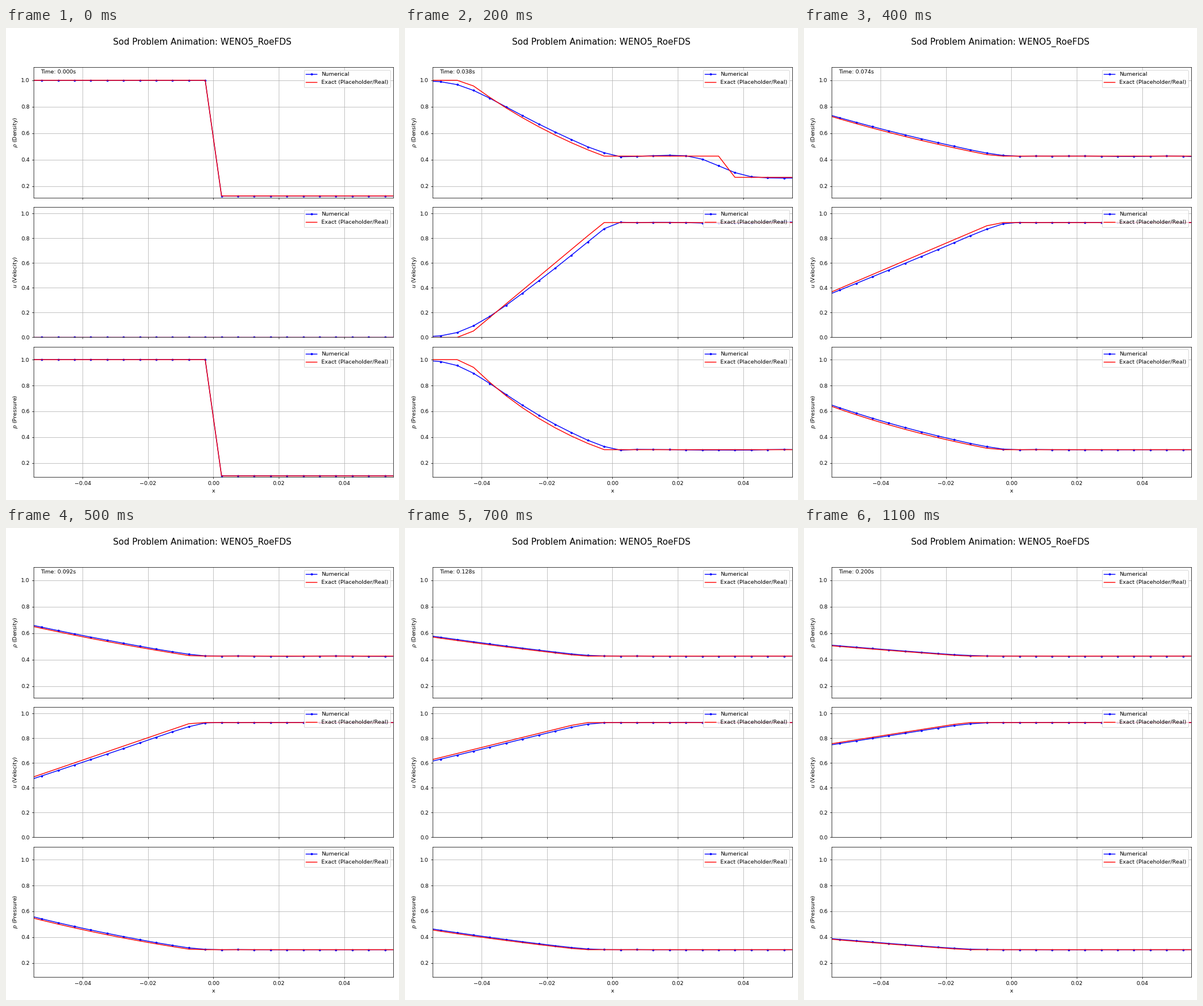
A matplotlib script for the animation above (1200 ms loop, 683 by 820 pixels).

```python
import numpy as np
import matplotlib.pyplot as plt
from matplotlib.animation import FuncAnimation

W, H, DPI = 683, 820, 68.3
FRAMES, INTERVAL = 12, 100
GAMMA, CFL = 1.4, 0.5
N = 200
DX = 1 / N
X = -0.5 + DX * (np.arange(N) + 0.5)
TIMES = [0.0] + [min(0.0198 + 0.0181 * k, 0.2) for k in range(FRAMES - 1)]


def conserved(rho, u, p):
    return np.array([rho, rho * u, p / (GAMMA - 1) + 0.5 * rho * u**2])


def primitive(q):
    rho = np.maximum(q[0], 1e-6)
    u = q[1] / rho
    p = np.maximum((GAMMA - 1) * (q[2] - 0.5 * rho * u**2), 1e-6)
    return rho, u, p


def weno5(a, b, c, d, e):
    """Fifth-order value at the face between c and d."""
    s0 = 13 / 12 * (a - 2 * b + c) ** 2 + 0.25 * (a - 4 * b + 3 * c) ** 2
    s1 = 13 / 12 * (b - 2 * c + d) ** 2 + 0.25 * (b - d) ** 2
    s2 = 13 / 12 * (c - 2 * d + e) ** 2 + 0.25 * (3 * c - 4 * d + e) ** 2
    w0, w1, w2 = (g / (1e-6 + s) ** 2 for g, s in ((0.1, s0), (0.6, s1), (0.3, s2)))
    v0 = (2 * a - 7 * b + 11 * c) / 6
    v1 = (-b + 5 * c + 2 * d) / 6
    v2 = (2 * c + 5 * d - e) / 6
    return (w0 * v0 + w1 * v1 + w2 * v2) / (w0 + w1 + w2)


def flux(q, u, p):
    return np.array([q[1], q[1] * u + p, (q[2] + p) * u])


def roe_flux(ql, qr):
    rl, ul, pl = primitive(ql)
    rr, ur, pr = primitive(qr)
    sl, sr = np.sqrt(rl), np.sqrt(rr)

    def mean(a, b):
        return (sl * a + sr * b) / (sl + sr)

    rho, u = sl * sr, mean(ul, ur)
    h = mean((ql[2] + pl) / rl, (qr[2] + pr) / rr)
    c = np.sqrt(np.maximum((GAMMA - 1) * (h - 0.5 * u**2), 1e-8))
    dr, du, dp = rr - rl, ur - ul, pr - pl
    one = np.ones_like(u)
    waves = (
        (u - c, (dp - rho * c * du) / (2 * c**2), (one, u - c, h - u * c)),
        (u, dr - dp / c**2, (one, u, 0.5 * u**2)),
        (u + c, (dp + rho * c * du) / (2 * c**2), (one, u + c, h + u * c)),
    )
    diss = sum(np.abs(s) * a * np.array(vec) for s, a, vec in waves)
    return 0.5 * (flux(ql, ul, pl) + flux(qr, ur, pr) - diss)


def rhs(q):
    pad = np.pad(q, ((0, 0), (3, 3)), mode="edge")
    v = [pad[:, k:k + N + 1] for k in range(6)]
    f = roe_flux(weno5(*v[:5]), weno5(*v[5:0:-1]))
    return -np.diff(f, axis=1) / DX


def advance(q, span):
    """Third-order Runge-Kutta steps until span has passed."""
    while span > 1e-12:
        rho, u, p = primitive(q)
        speed = np.max(np.abs(u) + np.sqrt(GAMMA * p / rho))
        dt = min(CFL * DX / speed, span)
        q1 = q + dt * rhs(q)
        q2 = 0.75 * q + 0.25 * (q1 + dt * rhs(q1))
        q = q / 3 + 2 / 3 * (q2 + dt * rhs(q2))
        span -= dt
    return q


def exact(t):
    """Rarefaction, contact and shock of the shock tube at time t."""
    left = X < 0
    if t == 0:
        return np.where(left, 1, 0.125), 0 * X, np.where(left, 1, 0.1)
    u_star, p_star = 0.92745, 0.30313
    c0 = np.sqrt(GAMMA)
    xi = X / t
    u = np.clip(2 / (GAMMA + 1) * (c0 + xi), 0, u_star)
    c = 1 - 0.5 * (GAMMA - 1) * u / c0
    rho, p = c ** (2 / (GAMMA - 1)), c ** (2 * GAMMA / (GAMMA - 1))
    rho = np.where(xi > u_star, 0.26557, rho)
    ahead = xi > 1.75216
    return (np.where(ahead, 0.125, rho), np.where(ahead, 0, u),
            np.where(ahead, 0.1, np.where(xi > u_star, p_star, p)))


def solve():
    q = conserved(*exact(0))
    states = [primitive(q)]
    for t0, t1 in zip(TIMES, TIMES[1:]):
        q = advance(q, t1 - t0)
        states.append(primitive(q))
    return states


states = solve()

fig = plt.figure(figsize=((W + 0.01) / DPI, (H + 0.01) / DPI), dpi=DPI)
fig.suptitle("Sod Problem Animation: WENO5_RoeFDS", fontsize=16)

PANELS = (
    (r"$\rho$ (Density)", 0.1125, 1.1),
    (r"$u$ (Velocity)", 0, 1.054),
    (r"$p$ (Pressure)", 0.09, 1.1),
)
LEFT, RIGHT, TOP, HEIGHT, STEP = 48, 672.8, 67.9, 226.7, 242.9

lines = []
for i, (label, low, high) in enumerate(PANELS):
    bottom = H - TOP - HEIGHT - i * STEP
    ax = fig.add_axes([LEFT / W, bottom / H, (RIGHT - LEFT) / W, HEIGHT / H])
    num, = ax.plot(X, states[0][i], "b.-", label="Numerical")
    ref, = ax.plot(X, exact(0)[i], "r-", label="Exact (Placeholder/Real)")
    lines.append((num, ref))
    ax.set_xlim(-0.055, 0.055)
    ax.set_ylim(low, high)
    ax.set_xticks([-0.04, -0.02, 0, 0.02, 0.04])
    ax.set_yticks([v for v in np.arange(6) / 5 if v >= low])
    ax.set_ylabel(label)
    ax.grid(True)
    ax.legend(loc="upper right")
    if i == 0:
        clock = ax.text(0.02, 0.95, "", transform=ax.transAxes)
    if i < 2:
        ax.tick_params(labelbottom=False)
    else:
        ax.set_xlabel("x")


def update(k):
    ref_state = exact(TIMES[k])
    for (num, ref), a, b in zip(lines, states[k], ref_state):
        num.set_ydata(a)
        ref.set_ydata(b)
    clock.set_text(f"Time: {TIMES[k]:.3f}s")
    return [clock, *(line for pair in lines for line in pair)]


anim = FuncAnimation(fig, update, frames=FRAMES, interval=INTERVAL, repeat=True, repeat_delay=0)
plt.show()
```
